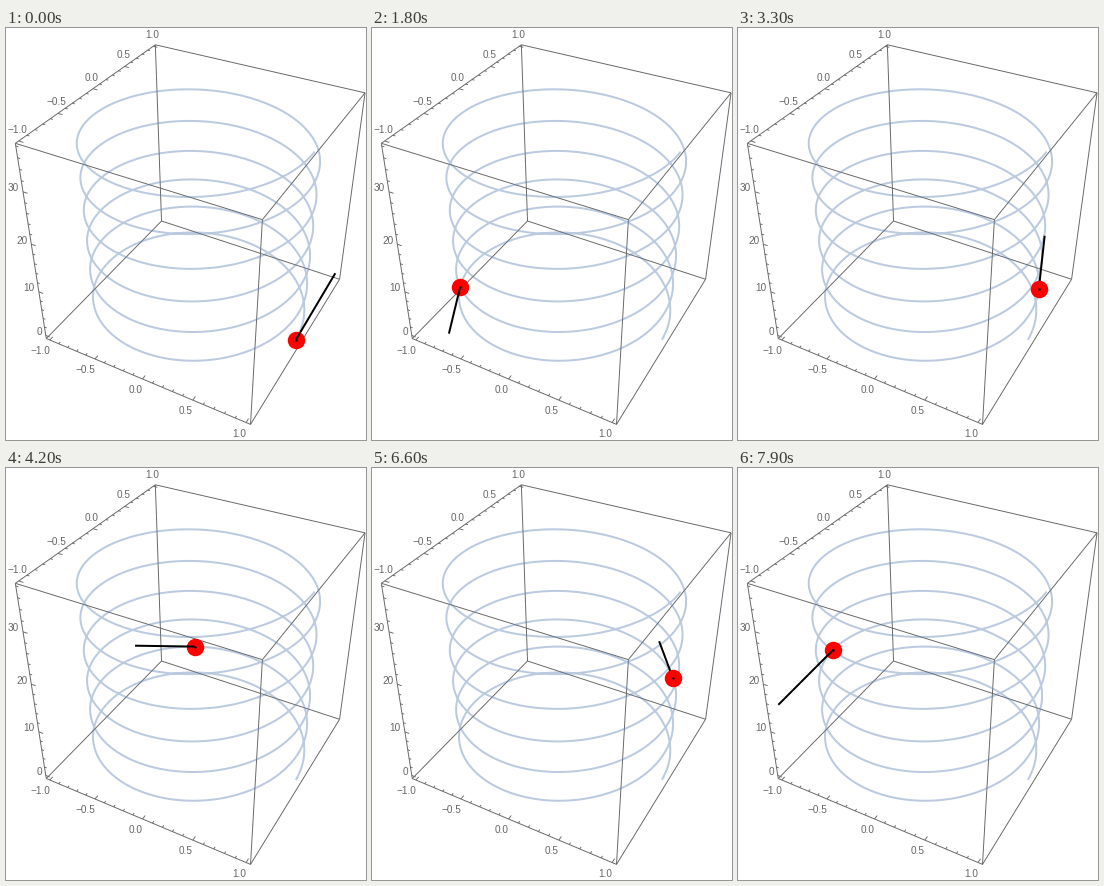
Write a matplotlib script that moves like this. It is 360x412 px and loops after 8000 ms.

```python
import itertools
import numpy as np
import matplotlib.pyplot as plt
from matplotlib.animation import FuncAnimation

W, H, DPI = 360, 412, 100
PX = 72 / DPI                      # one pixel in points
FRAMES, STEP = 80, 0.2
T_MAX = 12 * np.pi
PAD = 1.04                         # box size relative to the data range
GREY = "#666666"
BLUE = (0.368, 0.507, 0.710)

# Camera looking at the centre of a unit box
EYE = np.array([1.3, -2.4, 2.0])
DIST = np.linalg.norm(EYE)
FWD = -EYE / DIST
RIGHT = np.cross(FWD, [0, 0, 1])
RIGHT /= np.linalg.norm(RIGHT)
UP = np.cross(RIGHT, FWD)
SCALE, CX, CY = 794.5, 193.4, 192.5


def project(p):
    p = np.asarray(p, float)
    depth = DIST + p @ FWD
    return CX + SCALE * (p @ RIGHT) / depth, CY - SCALE * (p @ UP) / depth


def to_box(p):
    x, y, z = np.asarray(p, float).T
    return np.stack([x / 2, y / 2, z / T_MAX - 0.5], axis=-1) / PAD


def helix(t):
    return np.stack([np.cos(t), np.sin(t), t], axis=-1)


def tangent(t):
    """Unit-step tangent segment, cut off at the walls of the box."""
    start = helix(t)
    step = np.array([-np.sin(t), np.cos(t), 1.0])
    length = 1.0
    for a, d in zip(start[:2], step[:2]):
        if abs(d) > 1e-9:
            length = min(length, (np.sign(d) * PAD - a) / d)
    return np.array([start, start + length * step])


fig = plt.figure(figsize=(W / DPI, H / DPI), dpi=DPI, facecolor="white")
ax = fig.add_axes([0, 0, 1, 1])
ax.set_xlim(0, W)
ax.set_ylim(H, 0)
ax.axis("off")


def stroke(points, color=GREY, width=1.0, **kw):
    kw.setdefault("solid_capstyle", "butt")
    return ax.plot(*project(points), color=color, lw=width * PX, **kw)[0]


def label(x, y, text, ha):
    ax.text(x, y, text.replace("-", "\u2212"), ha=ha, va="center_baseline",
            family="Liberation Sans", fontsize=10 * PX, color=GREY)


def ticks(place, inward, values, is_major, form, offset, ha):
    inward = np.array(inward)
    for v in values:
        p = np.array(place(v))
        major = is_major(v)
        stroke([p, p + inward * (0.022 if major else 0.012)], width=0.9)
        if major:
            x, y = project(p)
            label(x + offset[0], y + offset[1], form(v), ha)


# Box
corners = list(itertools.product((-0.5, 0.5), repeat=3))
for a, b in itertools.combinations(corners, 2):
    if sum(u != v for u, v in zip(a, b)) == 1:
        stroke([a, b], width=0.95, zorder=2)

# Axes
tenths = range(-10, 11)
half = lambda v: v % 5 == 0
decimal = lambda v: f"{v / 10:.1f}"
ticks(lambda v: (v / 20 / PAD, -0.5, -0.5), (0, 1, 0),
      tenths, half, decimal, (0.3, 10), "right")
ticks(lambda v: (-0.5, v / 20 / PAD, 0.5), (1, 0, 0),
      tenths, half, decimal, (-1.3, -12), "center")
ticks(lambda v: (-0.5, -0.5, (v / T_MAX - 0.5) / PAD), (1, 0, 0),
      range(0, 39, 2), lambda v: v % 10 == 0, str, (-4, -4.5), "right")

# Helix, ball and tangent
stroke(to_box(helix(np.linspace(0, T_MAX, 900))), color=BLUE, width=2,
       alpha=0.42, zorder=3)
ball, = ax.plot([], [], "o", ms=17.5 * PX, mfc="red", mec="none", zorder=5)
dot, = ax.plot([], [], "o", ms=2.4 * PX, mfc="black", mec="none", zorder=7)
line, = ax.plot([], [], color="black", lw=2 * PX, solid_capstyle="butt")


def update(i):
    t = i * STEP
    xs, ys = project(to_box(tangent(t)))
    line.set_data(xs, ys)
    ball.set_data(xs[:1], ys[:1])
    dot.set_data(xs[:1], ys[:1])
    # The ball hides the line when it runs steeply away from the viewer
    away = 0.13 < t % (2 * np.pi) < 0.86
    line.set_zorder(4 if away else 6)
    return ball, dot, line


anim = FuncAnimation(fig, update, frames=FRAMES, interval=100,
                     repeat=True, repeat_delay=0, blit=False)
plt.show()
```
